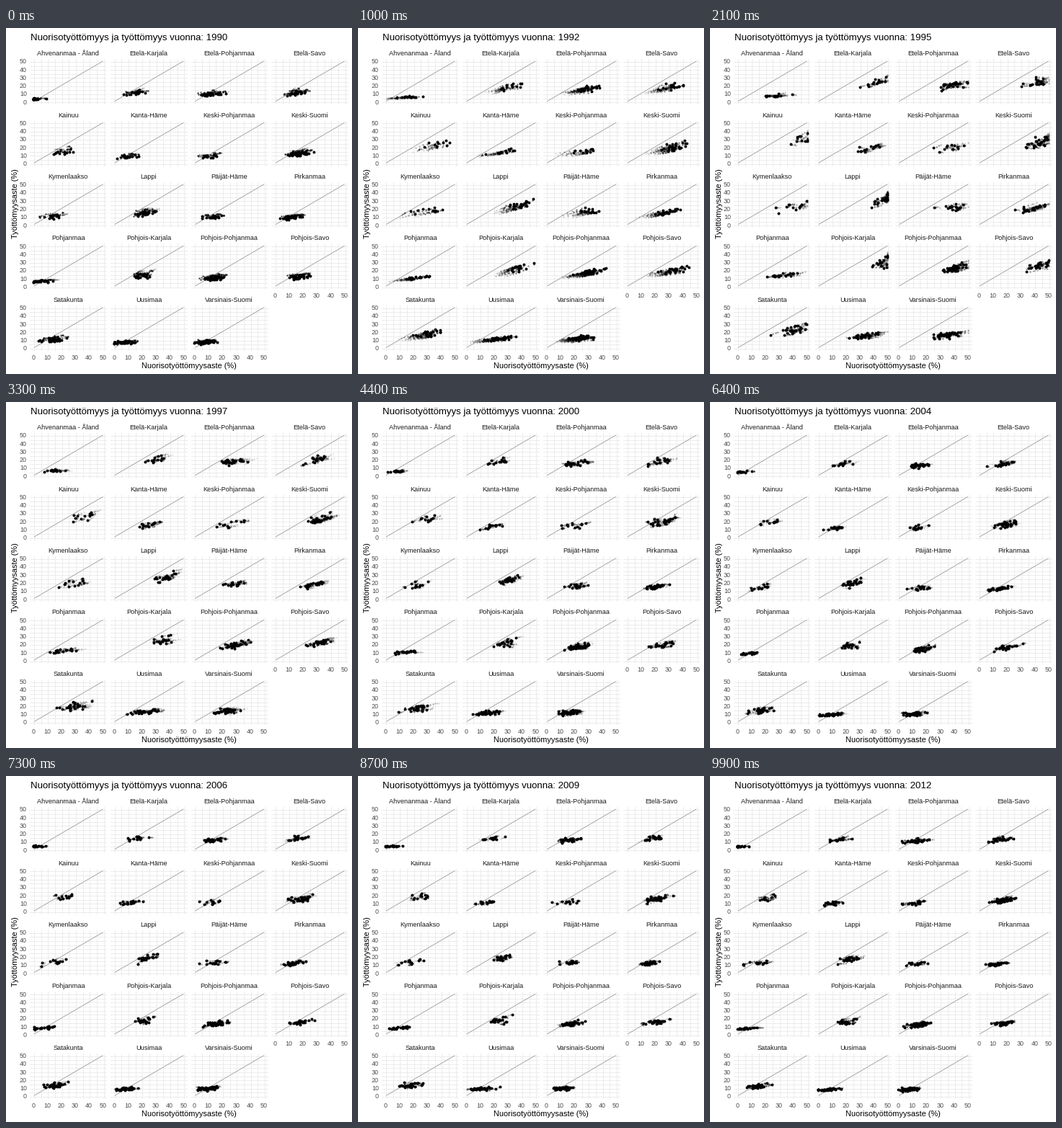
Write a matplotlib script that moves like this. It is 480 by 480 pixels and loops after 10000 ms.

```python
import numpy as np
import matplotlib.pyplot as plt
from matplotlib.animation import FuncAnimation
from matplotlib.collections import LineCollection

SIZE, DPI = 480, 80
PT = 72 / DPI  # points per pixel
FRAMES, INTERVAL = 100, 100
FIRST, LAST = 1990, 2012
COLS = 4
WAKE = 5

plt.rcParams["font.family"] = ["Liberation Sans", "DejaVu Sans"]

# name, number of municipalities, unemployment relative to the country
REGIONS = [
    ("Ahvenanmaa - Åland", 16, .35),
    ("Etelä-Karjala", 14, 1.1),
    ("Etelä-Pohjanmaa", 27, .95),
    ("Etelä-Savo", 19, 1.1),
    ("Kainuu", 11, 1.4),
    ("Kanta-Häme", 15, .85),
    ("Keski-Pohjanmaa", 12, .9),
    ("Keski-Suomi", 30, 1.2),
    ("Kymenlaakso", 12, 1.05),
    ("Lappi", 23, 1.45),
    ("Päijät-Häme", 16, 1),
    ("Pirkanmaa", 27, .95),
    ("Pohjanmaa", 18, .65),
    ("Pohjois-Karjala", 18, 1.35),
    ("Pohjois-Pohjanmaa", 38, 1.05),
    ("Pohjois-Savo", 25, 1.2),
    ("Satakunta", 27, 1.05),
    ("Uusimaa", 32, .7),
    ("Varsinais-Suomi", 42, .75),
]


def px(col, value):
    return 38 + 111.67 * col + 1.931 * np.asarray(value)


def py(row, value):
    return 102.3 + 85.42 * row - 1.128 * np.asarray(value)


def national(start, peak, base, decay, bump):
    """Yearly rate: steep rise to 1994, slow decay, small bump near 2009."""
    t = np.arange(LAST - FIRST + 1)
    u = np.minimum(t / 4, 1)
    rise = start + (peak - start) * u * u * (3 - 2 * u)
    fall = base + (peak - base) * np.exp(-(t - 4) / decay)
    return np.where(t < 4, rise, fall) + bump * np.exp(-((t - 19.5) / 1.8) ** 2)


def standard(rng, *shape):
    z = np.clip(rng.normal(size=shape), -2.1, 2.1)
    return z - z.mean(axis=-1, keepdims=True)


def simulate():
    """Pixel positions of all municipalities, one row per year."""
    rng = np.random.default_rng(19)
    youth = national(13, 43, 11.5, 5, 4.5)[:, None]
    total = national(9.5, 22.5, 10, 8, 1.2)[:, None]
    spread = 3.6 + .07 * youth
    xs, ys = [], []
    for i, (_, n, level) in enumerate(REGIONS):
        row, col = divmod(i, COLS)
        years = len(youth)
        dx = spread * (.8 * standard(rng, n) + .55 * standard(rng, years, n))
        wobble = .75 * standard(rng, n) + .5 * standard(rng, years, n)
        x = youth + 20 * (level - 1) + dx
        y = total * level * (1 + .013 * dx + .13 * wobble)
        xs.append(px(col, np.clip(x, 0, 50)))
        ys.append(py(row, np.clip(y, 1, 50)))
    return np.hstack(xs), np.hstack(ys)


XS, YS = simulate()


def positions(frame):
    t = (LAST - FIRST) * (frame % FRAMES) / (FRAMES - 1)
    k = min(int(t), LAST - FIRST - 1)
    f = t - k
    return [(1 - f) * a[k] + f * a[k + 1] for a in (XS, YS)]


fig = plt.figure(figsize=(SIZE / DPI, SIZE / DPI), dpi=DPI, facecolor="white")
ax = fig.add_axes([0, 0, 1, 1])
ax.set_xlim(0, SIZE)
ax.set_ylim(SIZE, 0)
ax.axis("off")


def label(x, y, text, size, color="black", **kw):
    return ax.text(x, y, text, fontsize=size * PT, color=color,
                   va="baseline", **kw)


def tick(x, y, value, align):
    label(x, y, str(value), 8.9, "#4d4d4d", ha=align)


def snap(v):
    return np.round(v) + .5


def draw_panels():
    grid, diagonals = [], []
    for i, (name, *_) in enumerate(REGIONS):
        row, col = divmod(i, COLS)
        left, right = px(col, (-2.5, 52.5))
        bottom, top = py(row, (-2.5, 52.5))
        for v in range(0, 51, 5):
            gx, gy = snap(px(col, v)), snap(py(row, v))
            grid += [[(gx, top), (gx, bottom)], [(left, gy), (right, gy)]]
        diagonals.append(list(zip(px(col, (.5, 50)), py(row, (.5, 50)))))
        label((left + right) / 2, top - 5, name, 9.15, "#1a1a1a", ha="center")
        for v in range(0, 51, 10):
            if col == 0:
                tick(29, py(row, v) + 3.4, v, "right")
            if i + COLS >= len(REGIONS):
                tick(px(col, v), bottom + 13, v, "center")
    ax.add_collection(LineCollection(grid, colors="#ebebeb", linewidths=PT,
                                     antialiaseds=False, zorder=1))
    ax.add_collection(LineCollection(diagonals, colors="#999999",
                                     linewidths=.8 * PT, zorder=2))


def dots(size, z):
    line, = ax.plot([], [], "o", color="black", markersize=size * PT,
                    markeredgewidth=0, antialiased=False, zorder=z)
    return line


draw_panels()
title = label(33.5, 17, "", 13.2)
label(253.8, 472.5, "Nuorisotyöttömyysaste (%)", 11, ha="center")
ax.text(18, 244, "Työttömyysaste (%)", fontsize=11 * PT, rotation=90,
        ha="right", va="center")

wake = [dots(2.5 - .1 * k, 10 - k) for k in range(1, WAKE + 1)]
heads = dots(3.9, 11)


def draw(frame):
    u = frame / (FRAMES - 1)
    year = FIRST + (LAST - FIRST) * u
    title.set_text(f"Nuorisotyöttömyys ja työttömyys vuonna: {year:.0f}")
    heads.set_data(*positions(frame))
    shade = .45 + .4 * (2 * u - 1) ** 4
    for k, line in enumerate(wake, 1):
        line.set_data(*positions(frame - k))
        line.set_alpha(shade * (1 - k / (WAKE + 1)) ** .7)
    return [title, heads, *wake]


anim = FuncAnimation(fig, draw, frames=FRAMES, interval=INTERVAL, repeat=True)
plt.show()
```
